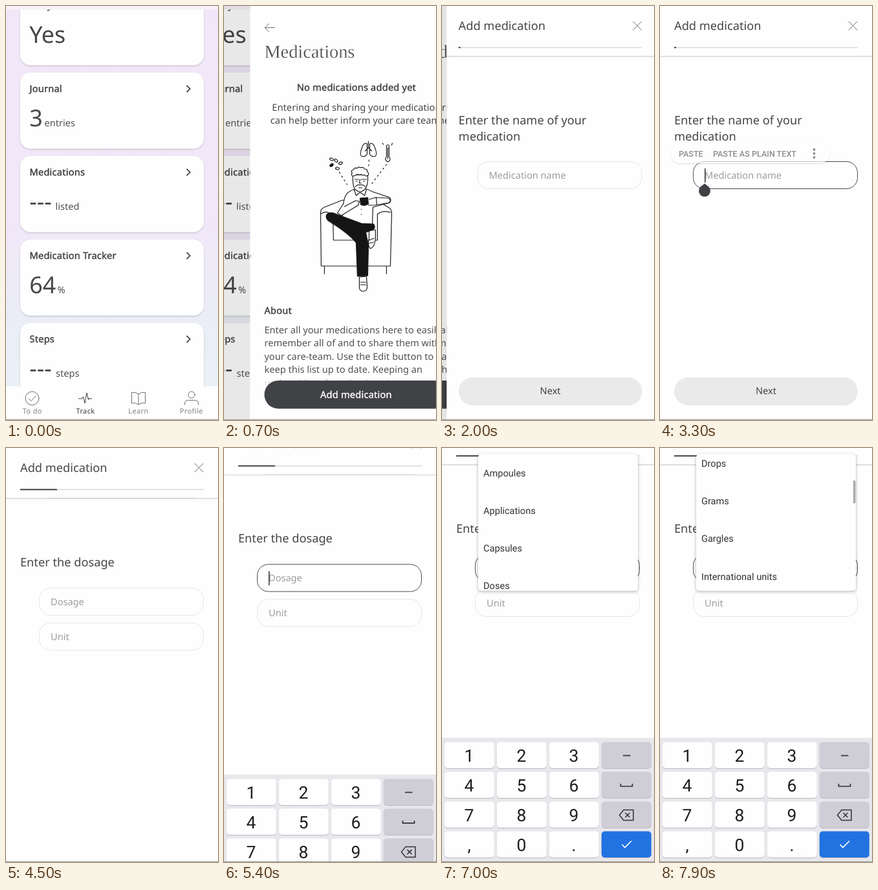
These frames come from a looping animation (328 px wide and 640 px high, 8000 ms). An HTML page:

```html
<!DOCTYPE html>
<html lang="en">
<head>
<meta charset="utf-8">
<title>Medication tracker</title>
<style>
html, body { margin: 0; width: 100%; height: 100%; overflow: hidden; background: #fefefe; }
svg { display: block; width: 328px; height: 640px; }
text { font: 14.58px "Noto Sans", "Open Sans", sans-serif; fill: #505155; white-space: pre; text-rendering: geometricPrecision; }
.semi { fill: #3c3d40; stroke: #3c3d40; stroke-width: .4px; letter-spacing: .22px; }
.big { font-size: 35.8px; fill: #454649; }
.title { font-size: 18.22px; fill: #454649; }
.serif { font: 28.3px "Liberation Serif", serif; fill: #4a4a4c; stroke: #fefefe; stroke-width: .35px; }
.lead { font-size: 14.68px; fill: #47484b; }
.hint { fill: #9d9d9f; }
.tab { font-size: 10.93px; letter-spacing: .4px; fill: #808184; }
.on { fill: #3c3d40; }
.light { fill: #fff; stroke: #fff; }
.key { font: 26.5px Roboto, sans-serif; fill: #1d1d20; }
.menu { font: 500 12.6px Roboto, sans-serif; fill: #555; }
.item { font: 14.58px Roboto, sans-serif; fill: #333; }
.line { fill: none; stroke: #6c6d70; stroke-width: 1; stroke-linecap: round; stroke-linejoin: round; }
.ink { fill: #fff; stroke: #1c1c1c; stroke-width: 1.2; stroke-linecap: round; stroke-linejoin: round; }
.ink .none { fill: none; }
.ink .solid { fill: #151515; }
.ink .dash { fill: none; stroke-dasharray: 2 5; }
</style>
</head>
<body>
<svg id="stage" viewBox="0 0 328 640"></svg>
<script>
const text = (x, y, s, cls = '', anchor = 'start', id = '') =>
  `<text ${id && `id="${id}"`} x="${x}" y="${y}" class="${cls}" text-anchor="${anchor}">${s}</text>`;
const rect = (x, y, w, h, r, fill, more = '') =>
  `<rect x="${x}" y="${y}" width="${w}" height="${h}" rx="${r}" fill="${fill}" ${more}/>`;
const path = (d, cls = '') => `<path d="${d}" class="${cls}"/>`;
const group = (id, body, more = '') => `<g id="${id}" ${more}>${body}</g>`;
const field = (id, y) =>
  rect(51.5, y + .5, 254, 42, 17, '#fefefe', `id="${id}" stroke="#e6e6e7"`);

function card(i, title, value, unit, unitX) {
  const y = -26 + 129 * i;
  return rect(22, y, 284, 117.5, 16, '#fefefe', 'filter="url(#soft)"') +
    text(36.5, y + 30, title, 'semi') +
    `<path d="M279.5 ${y + 30.2}l5.2 -5.2l-5.2 -5.2" fill="none" stroke="#3c3d40" stroke-width="1.7"/>` +
    text(36.3, y + 83, value, 'big') + text(unitX, y + 83, unit);
}

function trackPage() {
  return rect(0, 0, 328, 640, 0, 'url(#lilac)') +
    card(0, 'Daily', 'Yes', '', 0) +
    card(1, 'Journal', '3', 'entries', 59.5) +
    card(2, 'Medications', '---', 'listed', 76.5) +
    card(3, 'Medication Tracker', '64', '%', 79.5) +
    card(4, 'Steps', '---', 'steps', 77) +
    rect(0, 0, 328, 5.5, 0, '#f7f1fa') +
    rect(0, 588, 328, 52, 0, '#fefefe') +
    `<g class="line"><circle cx="40.5" cy="606.5" r="10.5"/>
     <path d="M35.5 607l3.5 3.5l7 -7.5"/>
     <path d="M205 600q-5 -4 -10.5 -2.5v16.5q6 -1.5 10.5 2q4.5 -3.5 10.5 -2v-16.5q-5.5 -1.5 -10.5 2.5v16"/>
     <circle cx="287" cy="601" r="5"/><path d="M276.5 616.5v-2q0 -5 6 -5h9q6 0 6 5v2"/>
     <path d="M112.5 607h5l2 -3l2.5 10l3 -16l2.5 11l1.5 -3l1 1h3" stroke="#3c3d40"/></g>` +
    text(40.8, 630, 'To do', 'tab', 'middle') + text(123, 630, 'Track', 'tab on', 'middle') +
    text(205, 630, 'Learn', 'tab', 'middle') + text(287, 630, 'Profile', 'tab', 'middle');
}

function drawing() {
  const pill = (x, y, a) => `<ellipse cx="${x}" cy="${y}" rx="2.9" ry="1.8" transform="rotate(${a} ${x} ${y})"/>`;
  return '<g class="ink">' +
    // chair
    path('M115 402v12M211 402v12') +
    path('M110 402l-1 -82q0 -7 6 -9l23 -9q2 -2 8 -2h46q8 0 10 4l13 8q4 2 4 9l-2 81z') +
    path('M110 321q9 -7 18 4l1 37h68v-40q8 -7 20 -3', 'none') +
    // body and arms
    path('M143 326q0 -32 9 -38q8 -6 18 -6q12 0 19 5l27 9q3 4 0 8l-26 7l-1 27h-42z') +
    path('M144 306q-5 8 -9 14l6 4l26 -16l2 -6l-6 -1l-17 9') +
    path('M184 299l10 -3l20 1q5 3 1 7l-22 4l-10 0M195 296l1 11') +
    path('M161 284l3 9l6 -5l7 5l3 -9M172 314v.5M172 322v.5', 'none') +
    path('M170 297l12 -1l1 10q-6 4 -12 1z', 'solid') +
    // head
    path('M159 261q-1 18 4 23q7 6 14 0q6 -6 5 -23z') +
    path('M159 263q-4 -2 -1 -5q-3 -4 2 -5q1 -4 5 -2q3 -3 6 -1q4 -2 6 2q5 0 4 4q4 3 1 6q-3 2 -5 -1q-3 2 -5 -1q-4 2 -6 0q-4 3 -7 3z') +
    path('M162 268h6m4 0h8M170 268l-1 6h3M163 279q4 -4 7 -2q4 -2 8 2M168 281h5M164 271h2M175 271h2', 'none') +
    // legs and shoes
    path('M184 347l10 -1v14q-2 14 -8 15q-5 -6 -2 -15zM184 362l8 -3M184 367l7 -2') +
    path('M118 323q5 -6 16 -1l38 14l19 1q4 5 -1 9l-11 4l4 20l-1 47l-16 1l-2 -52q-11 -14 -40 -32q-8 -4 -6 -11z', 'solid') +
    path('M169 419l11 -1l1 14q1 9 -6 9q-7 0 -6 -9zM171 427h8M171 431h8') +
    // symptoms
    path('M183 209v10M181 213q-5 -3 -8 6q-4 10 -1 13q6 2 9 -3zM185 213q5 -3 8 6q4 10 1 13q-6 2 -9 -3zM183 219l-5 5M183 219l5 5') +
    path('M211 233v-17q2 -3 4 0v17q4 5 -2 8q-6 -3 -2 -8zM213 219v17M206 214l-1 -2M219 215l1 -3', 'none') +
    pill(126, 237, 20) + pill(140, 243, -25) + pill(135, 251, 10) +
    '<g class="solid">' + pill(126, 246, -35) + '</g>' + pill(133, 239, 40) +
    path('M138 257l12 19M184 238l-1 13M211 245l-23 30', 'dash') + '</g>';
}

function medsPage() {
  const about = ['Enter all your medications here to easily', 'remember all of and to share them with',
    'your care-team. Use the Edit button to', 'keep this list up to date. Keeping an', 'updated list of medications in'];
  return rect(0, 0, 328, 640, 0, '#fefefe') +
    path('M38 33.5h-15m6 -6l-6.5 6l6.5 6', 'line') +
    text(22, 79.5, 'Medications', 'serif') +
    text(164.5, 131, 'No medications added yet', 'semi', 'middle') +
    text(164.5, 161.5, 'Entering and sharing your medication', 'lead', 'middle') +
    text(164.5, 181.5, 'can help better inform your care team.', 'lead', 'middle') +
    drawing() +
    text(22, 475.5, 'About', 'semi') +
    about.map((s, i) => text(22, 506 + 20.45 * i, s)).join('') +
    rect(0, 566, 328, 74, 0, 'url(#fade)') +
    rect(22, 579, 284, 43.5, 21.7, '#414246') +
    text(164, 605.5, 'Add medication', 'semi light', 'middle');
}

function addPage() {
  const name = text(22, 182.5, 'Enter the name of your', 'title') + text(22, 208, 'medication', 'title') +
    field('nameBox', 240) + text(69, 266.5, 'Medication name', 'hint', 'start', 'nameHint') +
    text(69, 266.5, 'Ibuprofen', '', 'start', 'pasted');
  const dose = field('passed', 35) + text(22, 183, 'Enter the dosage', 'title') +
    field('doseBox', 216) + text(69, 242.5, 'Dosage', 'hint', 'start', 'doseHint') +
    text(69, 242.5, '', '', 'start', 'doseText') +
    field('unitBox', 270) + text(69, 296.5, 'Unit', 'hint');
  return group('page', rect(0, 0, 328, 700, 0, '#fefefe') +
    group('name', name) + group('dose', dose) +
    rect(0, 0, 328, 77, 0, '#fefefe', 'filter="url(#soft)"') +
    text(22, 36.5, 'Add medication', 'title') +
    path('M292 24l13 13m0 -13l-13 13', 'line') +
    rect(22, 63.5, 284, 1.6, 0, '#dcdcde') + rect(22, 63.3, 3, 1.9, 0, '#3c3d40', 'id="bar"') +
    group('next', rect(22, 574, 284, 43.5, 21.7, '#ebeaeb', 'id="nextBox"') +
      text(164, 600, 'Next', '', 'middle', 'nextText')) +
    rect(0, 0, 1.5, 22, 0, '#333', 'id="caret"') +
    group('handle', path('M69 274.5l6.4 5a9 9 0 1 1 -12.8 0z'), 'fill="#404145"') +
    group('paste', rect(16, 213, 247, 30, 15, '#fefefe', 'filter="url(#soft)"') +
      text(29, 232.5, 'PASTE', 'menu') + text(82, 232.5, 'PASTE AS PLAIN TEXT', 'menu') +
      [222, 228, 234].map(y => `<circle cx="238.5" cy="${y}" r="1.9" fill="#555"/>`).join('')));
}

function keyboard() {
  const labels = ['123', '456', '789', ',0.'];
  let s = rect(0, 448, 328, 192, 0, '#e7e7ec');
  labels.forEach((row, r) => {
    const y = 454.5 + 46 * r;
    for (let c = 0; c < 4; c++) {
      const x = 3.8 + 81 * c, fill = c < 3 ? '#fefefe' : r < 3 ? '#cfced7' : '#2273e1';
      s += rect(x, y + 1, 77, 40.5, 5, '#b9b9c0') +
        rect(x, y, 77, 40.5, 5, fill, c === 3 && r === 3 ? 'id="done"' : '');
      if (c < 3) s += text(x + 38.2, y + 30.3, row[c], 'key', 'middle');
    }
  });
  return s + `<g fill="none" stroke="#333" stroke-width="1.7">
    <path d="M280 475.5h11.5"/><path d="M276.5 519v4h18v-4"/>
    <path d="M281 559.5h15v16h-15l-6.5 -8zM283.5 564l7 7m0 -7l-7 7" stroke-width="1.5"/>
    <path d="M278.500 613l4.500 4.500l10 -10" stroke="#fff"/></g>`;
}

function dropdown() {
  const units = ['Ampoules', 'Applications', 'Capsules', 'Doses', 'Drops', 'Grams', 'Gargles', 'International units', 'Litres'];
  return rect(56, 9.5, 247, 211, 5, '#fefefe', 'filter="url(#lift)"') +
    '<g clip-path="url(#listClip)">' +
    group('list', units.map((u, i) => text(64, 43.5 + 58.3 * i, u, 'item')).join('')) + '</g>' +
    rect(299, 0, 3.5, 35, 0, '#ababad', 'id="thumb"');
}

const stage = document.getElementById('stage');
stage.innerHTML = `<defs>
  <linearGradient id="lilac" x2="0" y2="1"><stop stop-color="#f1e7f8"/><stop offset=".55" stop-color="#f0e8f8"/>
    <stop offset=".75" stop-color="#ebedf6"/><stop offset=".92" stop-color="#e9f1f7"/></linearGradient>
  <linearGradient id="fade" x2="0" y2="1"><stop stop-color="#fefefe" stop-opacity="0"/><stop offset=".3" stop-color="#fefefe"/></linearGradient>
  <filter id="soft" x="-5%" y="-20%" width="110%" height="150%"><feDropShadow dx="0" dy="1.2" stdDeviation="1.2" flood-opacity=".2"/></filter>
  <filter id="lift" x="-10%" y="-10%" width="120%" height="120%"><feDropShadow dx="0" dy="1.5" stdDeviation="2.5" flood-opacity=".3"/></filter>
  <clipPath id="listClip"><rect x="56" y="10" width="247" height="210"/></clipPath>
  <clipPath id="edge"><rect id="edgeBox" width="328" height="640"/></clipPath></defs>` +
  group('track', trackPage()) + rect(0, 0, 328, 640, 0, '#000', 'id="dim1"') +
  group('meds', medsPage()) + rect(0, 0, 328, 640, 0, '#000', 'id="dim2"') +
  group('add', addPage(), 'clip-path="url(#edge)"') +
  group('keys', keyboard()) + group('drop', dropdown()) +
  rect(0, 639, 328, 1, 0, '#929294');

const $ = {};
stage.querySelectorAll('[id]').forEach(e => $[e.id] = e);
const set = (id, key, v) => $[id].setAttribute(key, v);
const show = (id, on) => set(id, 'display', on ? 'inline' : 'none');
const move = (id, x, y = 0) => set(id, 'transform', `translate(${x} ${y})`);
const part = (t, a, b) => Math.min(1, Math.max(0, (t - a) / (b - a)));
const out = u => 1 - (1 - u) ** 3;
const mix = (a, b, u) => `rgb(${a.map((v, i) => Math.round(v + (b[i] - v) * u))})`;

// critically damped push from the right edge
function push(ms) {
  const w = Math.max(0, ms) * .0145;
  return ms >= 500 ? 1 : 1 - (1 + w) * Math.exp(-w);
}

function draw(time) {
  const t = Math.floor(time / 100) * 100;
  const p1 = push(t - 450), p2 = push(t - 1550);
  const off = 328 * (1 - p2);
  show('track', t < 1000); show('dim1', t < 1000);
  show('meds', t >= 500 && t < 2100); show('dim2', t < 2100);
  show('add', t >= 1600);
  move('track', -65.6 * p1);
  set('dim1', 'opacity', .1 * p1);
  move('meds', 328 * (1 - p1) - 65.6 * p2);
  set('dim2', 'opacity', .1 * p2);
  move('add', off);
  set('edgeBox', 'x', Math.min(4, off));

  // medication name
  const second = t >= 4500, focus = t >= 3100 && !second, filled = t >= 3800;
  show('name', !second); show('dose', second);
  set('nameBox', 'stroke', focus ? '#4a4b4e' : '#e6e6e7');
  show('nameHint', !filled); show('pasted', filled);
  show('handle', focus && t < 3700);
  const menu = part(t, 3100, 3400) * (1 - part(t, 3500, 3800));
  show('paste', menu > 0);
  set('paste', 'opacity', menu);
  set('bar', 'width', second ? 57 : 3);
  const ready = second ? 0 : part(t, 3700, 4100), press = second ? 0 : part(t, 4200, 4400) * .25;
  set('nextBox', 'fill', mix([235, 234, 235], [65, 66, 70], ready - press));
  set('nextText', 'style', `fill:${mix([66, 67, 71], [255, 255, 255], ready)}`);
  set('next', 'opacity', second ? part(t, 4500, 4800) : 1);

  // dosage
  const up = out(part(t, 5200, 5800)), typing = t >= 5300;
  move('page', 0, -52 * up);
  show('keys', typing);
  move('keys', 0, 192 * (1 - up));
  set('doseBox', 'stroke', typing ? '#4a4b4e' : '#e6e6e7');
  const typed = t >= 6300 ? '10' : t >= 6100 ? '1' : '';
  $.doseText.textContent = typed;
  show('doseHint', !typed);
  show('caret', focus || typing);
  if (typing) move('caret', 69 + 8.3 * typed.length, 227);
  else move('caret', filled ? 138.5 : 69, 251);

  // unit list
  set('done', 'fill', t >= 6600 && t < 6800 ? '#1a5dbb' : '#2273e1');
  const open = out(part(t, 6600, 7000));
  show('drop', open > 0);
  set('drop', 'opacity', open);
  const k = .85 + .15 * open;
  set('drop', 'transform', `translate(0 ${221 * (1 - k)}) scale(1 ${k})`);
  const u = part(t, 7400, 7900), scroll = 248 * (1 - (1 - u) ** 2);
  move('list', 0, -scroll);
  show('thumb', u > 0);
  set('thumb', 'y', 10 + scroll * .163);
}

const start = performance.now();
function tick() {
  draw((performance.now() - start) % 8000);
  requestAnimationFrame(tick);
}
tick();
</script>
</body>
</html>
```
